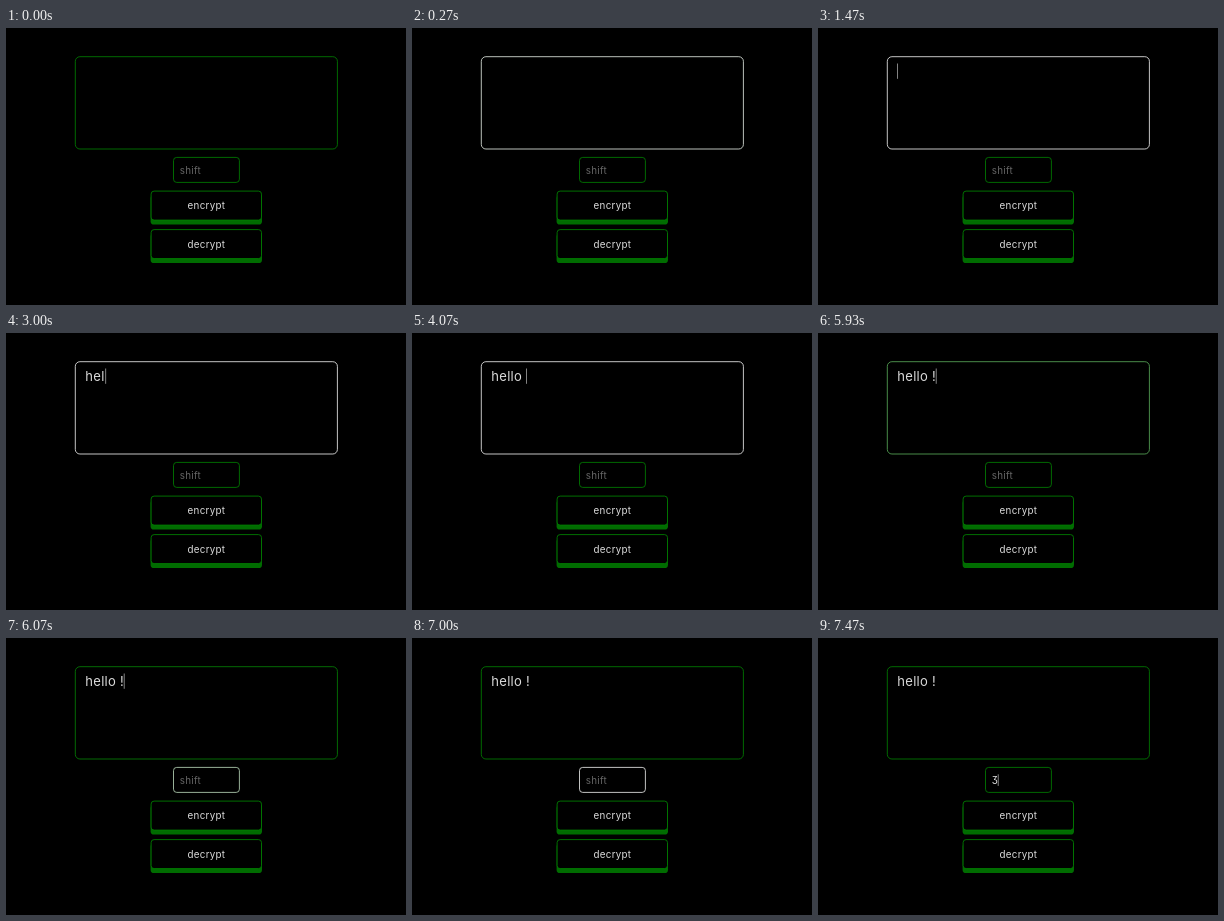
An HTML page for the animation above (8000 ms loop, 400 by 277 pixels).

```html
<!DOCTYPE html>
<html lang="en">
<head>
<meta charset="utf-8">
<title>Shift cipher form</title>
<style>
  html, body { margin: 0; width: 100%; height: 100%; overflow: hidden; background: #000; }
  svg { display: block; width: 100%; height: 100%; }
  text { font: 9.8px Inter, "Open Sans", sans-serif; letter-spacing: .28px; fill: #dcdcdc; white-space: pre; }
  #message { font-size: 13px; letter-spacing: .3px; }
  #shift { font-feature-settings: "cv09"; }
  .label { text-anchor: middle; }
  .field { fill: #000; stroke-width: .85; }
  .shadow { fill: #006c00; }
  .face { fill: #000; stroke: #007c00; stroke-width: .9; }
  .caret { fill: #bbb; }
</style>
</head>
<body>
<svg viewBox="0 0 400 277">
  <rect width="400" height="277"/>
  <rect id="messageBox" class="field" x="69.3" y="28.7" width="262.1" height="92.3" rx="4.6"/>
  <text id="message" x="79.3" y="47.9"></text>
  <rect id="messageCaret" class="caret" y="35.5" width=".7" height="15.3"/>
  <rect id="shiftBox" class="field" x="167.5" y="129.4" width="65.9" height="25" rx="3.2"/>
  <text id="shift" x="173.8" y="145.5"></text>
  <rect id="shiftCaret" class="caret" y="136.3" width=".7" height="11.6"/>
  <g id="buttons"></g>
</svg>
<script>
const LOOP = 8000, FADE = 300, CAPTURE_STEP = 1000 / 15;
const el = id => document.getElementById(id);

const button = (label, y) => `
  <rect class="shadow" x="144.6" y="${y + 4}" width="111.4" height="29.8" rx="3.4"/>
  <rect class="face" x="145.1" y="${y + .3}" width="110.4" height="29" rx="3"/>
  <text class="label" x="200.4" y="${y + 18.6}">${label}</text>`;
el('buttons').innerHTML = button('encrypt', 162.8) + button('decrypt', 201.3);

// [time, text, caret x or null when hidden]
const messageStates = [
  [0, '', null], [1470, '', 79.3], [2070, '', null],
  [2600, 'h', 88], [2730, 'he', 96], [3000, 'hel', 99.4],
  [3200, 'hell', 103], [3470, 'hello', 111], [4070, 'hello ', 114.3],
  [4470, 'hello !', 117.8], [5070, 'hello !', null],
  [5730, 'hello !', 117.8], [6270, 'hello !', null]
];
const shiftStates = [
  [0, '', null], [6400, '', 174], [7000, '', null], [7470, '3', 179.8]
];
const stateAt = (states, t) => states.filter(s => s[0] <= t).pop();

// CSS "ease" timing curve, solved by bisection
function ease(p) {
  if (p <= 0) return 0;
  if (p >= 1) return 1;
  const bezier = (a, b, u) => 3 * a * u * (1 - u) ** 2 + 3 * b * u * u * (1 - u) + u ** 3;
  let low = 0, high = 1;
  for (let i = 0; i < 20; i++) {
    const mid = (low + high) / 2;
    if (bezier(.25, .25, mid) < p) low = mid; else high = mid;
  }
  return bezier(.1, 1, low);
}

function hoverColor(t, enter, leave) {
  const lit = ease((t - enter) / FADE) - ease((t - leave) / FADE);
  const mix = (from, to) => Math.round(from + (to - from) * lit);
  return `rgb(${mix(0, 232)},${mix(124, 232)},${mix(0, 232)})`;
}

function setCaret(id, x) {
  el(id).setAttribute('visibility', x === null ? 'hidden' : 'visible');
  if (x !== null) el(id).setAttribute('x', x);
}

function render(t) {
  const step = Math.floor((t + 4) / CAPTURE_STEP) * CAPTURE_STEP;
  el('messageBox').style.stroke = hoverColor(step, 50, 5825);
  el('shiftBox').style.stroke = hoverColor(step, 5925, 6990);

  const [, message, messageCaret] = stateAt(messageStates, t);
  el('message').textContent = message;
  setCaret('messageCaret', messageCaret);

  const [, shift, shiftCaret] = stateAt(shiftStates, t);
  el('shift').textContent = shift || 'shift';
  el('shift').style.fill = shift ? '#dcdcdc' : '#666';
  setCaret('shiftCaret', shiftCaret);
}

const start = performance.now();
function tick() {
  render((performance.now() - start) % LOOP);
  requestAnimationFrame(tick);
}
tick();
</script>
</body>
</html>
```
